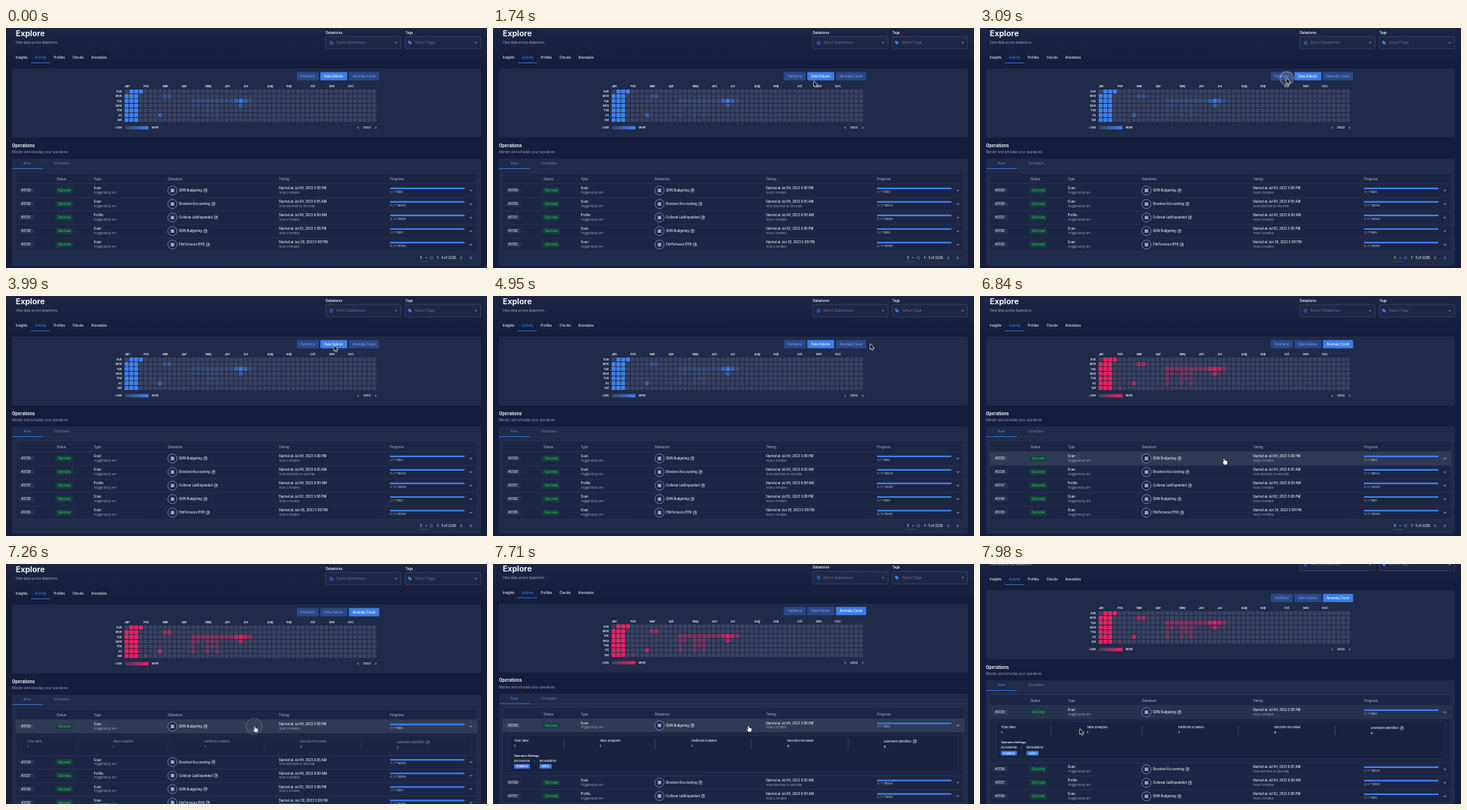
An HTML page with a canvas that plays this animation: 640x320 px, repeating every 8000 ms.

```html
<!DOCTYPE html>
<html lang="en">
<head>
<meta charset="utf-8">
<title>Explore</title>
<style>
html, body { margin: 0; width: 100%; height: 100%; overflow: hidden; background: #141d3b; }
canvas { display: block; width: 640px; height: 320px; }
</style>
</head>
<body>
<canvas></canvas>
<script>
const LOOP = 8000, ROW = 18.05, ROW_TOP = 207.6, PANEL = 58;
const WHITE = '#eef1f8', MUTED = '#a3abc2', DIM = '#6c7794', BLUE = '#3b7ee8', CARD = '#202a49';
const canvas = document.querySelector('canvas'), g = canvas.getContext('2d');
const dpr = window.devicePixelRatio || 1;
canvas.width = 640 * dpr;
canvas.height = 320 * dpr;

const months = { Jan: 0, Feb: 4, Mar: 8, Apr: 12, May: 17, Jun: 21, Jul: 25, Aug: 30, Sep: 34, Oct: 39, Nov: 43, Dec: 47 };
const days = ['Sun', 'Mon', 'Tue', 'Wed', 'Thu', 'Fri', 'Sat'];
// level, weekday, week columns
const heat = [
  [1, 0, [1, 2, 3]],
  ...[1, 2, 3, 4, 5, 6].map(d => [1, d, [0, 1, 2]]),
  [.3, 1, [8, 9]],
  [.17, 2, [14, 15, 16, 17, 18, 19, 20, 21, 22, 26]], [.5, 2, [23, 25]], [.9, 2, [24]],
  [.1, 3, [14, 15, 17, 18, 19]], [.45, 3, [24]],
  [.09, 4, [14, 17, 18, 19]],
  [.5, 5, [7]], [.1, 5, [14, 17, 19]],
  [.05, 6, [4]]
];
const runs = [
  ['#3139', 'Scan', 'QVN Budgeting', 'Jul 04, 2023 5:00 PM', '2 minutes', '1 / 1 Table'],
  ['#3138', 'Scan', 'Brookvel Accounting', 'Jul 04, 2023 6:05 AM', 'less than 20 seconds', '7 / 7 Tables'],
  ['#3137', 'Profile', 'Cellovar LabExpanded', 'Jul 04, 2023 6:00 AM', '2 minutes', '2 / 2 Tables'],
  ['#3136', 'Scan', 'QVN Budgeting', 'Jul 02, 2023 5:00 PM', '2 minutes', '1 / 1 Table'],
  ['#3135', 'Scan', 'ElmTerraces EHR', 'Jun 30, 2023 5:00 PM', '2 minutes', '5 / 5 Tables']
];
// time, x, y of the pointer tip
const path = [
  [240, 440, 326], [960, 430, 80], [1740, 427, 71], [2350, 430, 72], [2950, 408, 67], [3350, 408, 67],
  [4050, 437, 66], [4450, 440, 66], [4950, 502, 64], [5300, 480, 65], [5700, 478, 66],
  [6650, 324, 217], [7000, 324, 217], [7590, 339, 216], [7710, 339, 216], [7980, 133, 220]
];
const clicks = [2990, 5450, 7080];

const clamp = v => Math.max(0, Math.min(1, v));
const ease = v => { v = clamp(v); return v * v * (3 - 2 * v); };

function text(s, x, y, size = 4.15, color = WHITE, weight = 500, align = 'left') {
  g.save();
  g.translate(x, y + size * .36);
  g.scale(.1, .1); // large font scaled down keeps glyph spacing exact
  g.font = `${weight} ${size * 10}px Inter, sans-serif`;
  g.fillStyle = color;
  g.textAlign = align;
  g.fillText(s, 0, 0);
  const w = g.measureText(s).width / 10;
  g.restore();
  return w;
}
function box(x, y, w, h, fill, r = 0, stroke) {
  g.beginPath();
  g.roundRect(x, y, w, h, r);
  if (fill) { g.fillStyle = fill; g.fill(); }
  if (stroke) { g.strokeStyle = stroke; g.lineWidth = .5; g.stroke(); }
}
function line(points, color = WHITE, width = .6) {
  g.beginPath();
  points.forEach(([x, y]) => g.lineTo(x, y));
  g.strokeStyle = color;
  g.lineWidth = width;
  g.stroke();
}
function shape(points, fill) {
  g.beginPath();
  points.forEach(([x, y]) => g.lineTo(x, y));
  g.closePath();
  g.fillStyle = fill;
  g.fill();
}
function circle(x, y, r, fill, stroke, width = .6) {
  g.beginPath();
  g.arc(x, y, r, 0, 7);
  if (fill) { g.fillStyle = fill; g.fill(); }
  if (stroke) { g.strokeStyle = stroke; g.lineWidth = width; g.stroke(); }
}
const caret = (x, y) => shape([[x - 1.5, y - .7], [x + 1.5, y - .7], [x, y + .9]], MUTED);
const chevronV = (x, y, d) => line([[x - 1.6, y - .8 * d], [x, y + .8 * d], [x + 1.6, y - .8 * d]], WHITE, .7);
const chevronH = (x, y, d, s = 1) => line([[x - .8 * d * s, y - 1.6 * s], [x + .8 * d * s, y], [x - .8 * d * s, y + 1.6 * s]], WHITE, .7);
function linkIcon(x, y) {
  box(x, y - 2, 4, 4, null, .4, WHITE);
  line([[x + 1.2, y + .9], [x + 2.9, y - .9]]);
  line([[x + 1.6, y - 1], [x + 3, y - 1], [x + 3, y + .4]]);
}

function header() {
  text('Explore', 13, 7.5, 10.5, WHITE, 700);
  text('View data across datastores', 13, 19.6, 4.15, MUTED, 400);
  text('Datastores', 425.5, 6, 4.2, WHITE, 600);
  text('Tags', 531.5, 6, 4.2, WHITE, 600);
  for (const [x, label] of [[425.5, 'Select Datastores'], [531.5, 'Select Tags']]) {
    box(x, 11.2, 100, 16.8, 'rgba(255,255,255,.025)', 1.5, '#4b5675');
    text(label, x + 14 - (x > 500 ? 1.5 : 0), 19.7, 4.75, DIM, 400);
    caret(x + 93.5, 19.7);
  }
  box(430.8, 17.2, 4.6, 5, '#2f62b8', 1.5);
  line([[430.8, 19], [435.4, 19]], '#18233f', .5);
  line([[430.8, 20.7], [435.4, 20.7]], '#18233f', .5);
  shape([[535, 17.2], [537.5, 17.2], [540.2, 20], [537.8, 22.3], [535, 19.6]], BLUE);
  [['Insights', 13], ['Activity', 38.5], ['Profiles', 63.5], ['Checks', 88.5], ['Anomalies', 113.5]]
    .forEach(([s, x]) => text(s, x, 39.4, 4.15, s === 'Activity' ? BLUE : WHITE));
  box(33, 46, 25.5, .8, BLUE);
}

function heatmap(anomaly) {
  const hue = anomaly ? '#f0205f' : '#3c82f0';
  box(8, 54, 624, 92, CARD, 2);
  [['Partitions', 387, 29], ['Data Volume', 418.3, 35.7], ['Anomaly Count', 456.3, 40.2]].forEach(([s, x, w], i) => {
    const on = i === (anomaly ? 2 : 1);
    box(x, 58.7, w, 11, on ? BLUE : '#2a4886', 1);
    text(s, x + w / 2, 64.2, 4.15, on ? '#fff' : '#7399dd', 500, 'center');
  });
  const cx = c => 157.8 + c * 6.33, cy = d => 81.9 + d * 6.33;
  for (const m in months) text(m, cx(months[m]), 77.6, 3.9, WHITE, 600);
  days.forEach((s, d) => {
    text(s, 154, cy(d) + 2.8, 3.7, WHITE, 600, 'right');
    for (let c = 0; c < 53; c++) box(cx(c), cy(d), 5.4, 5.4, '#39435f', .8);
  });
  for (const [level, d, cols] of heat) {
    g.globalAlpha = anomaly ? Math.sqrt(level) : level;
    cols.forEach(c => box(cx(c), cy(d), 5.4, 5.4, hue, .8));
  }
  g.globalAlpha = 1;
  text('Less', 145.5, 133, 3.8, WHITE, 600);
  text('More', 194, 133, 3.7, WHITE, 600);
  const fade = g.createLinearGradient(158, 0, 189.5, 0);
  fade.addColorStop(0, '#39435f');
  fade.addColorStop(1, hue);
  box(158.3, 130.8, 31.2, 4.4, fade, .5);
  chevronH(468.7, 133, -1, .8);
  text('2023', 480.3, 133, 3.9, WHITE, 600, 'center');
  chevronH(492, 133, 1, .8);
}

function details(open) {
  g.save();
  g.beginPath();
  g.rect(13, ROW_TOP + ROW, 614, PANEL * open);
  g.clip();
  g.globalAlpha = open;
  box(22, 229.5, 596, 49, 'rgba(14,22,48,.18)', 1.5, '#2c3756');
  [['Total Table', 28, 1], ['Table Analyzed', 142, 1], ['Partitions Scanned', 264, 1], ['Records Processed', 391.5, 0], ['Anomalies Identified', 520, 0]]
    .forEach(([s, x, n], i) => {
      const y = 236.9 + (i === 4 ? 1 : 0);
      const w = text(s, x, y, 3.75);
      text(n, x, y + 7, 3.9, WHITE, 700);
      if (i === 4) linkIcon(x + w + 2.5, y);
    });
  [94.5, 215.5, 343.5, 472].forEach(x => box(x, 234.5, .6, 13, '#4b5675'));
  text('Operation Settings', 28, 257, 3.65, WHITE, 700);
  text('Incremental', 28, 264, 3.7);
  text('Remediation', 62, 264, 3.7);
  box(55.3, 262, .4, 4, DIM);
  box(28, 268.2, 21, 6, BLUE, 1);
  text('Enabled', 38.5, 271.2, 3.8, '#fff', 500, 'center');
  box(62, 268.2, 16, 6, BLUE, 1);
  text('None', 70, 271.2, 3.8, '#fff', 500, 'center');
  g.restore();
}

function run([id, type, store, start, took, done], i, y, hover, open) {
  const top = y - ROW / 2;
  if (hover) box(13, top, 614, ROW, 'rgba(255,255,255,.09)');
  else if (!i && open) box(13, top, 614, ROW, 'rgba(255,255,255,.05)');
  box(13, top, 614, .5, '#303b5a');
  box(17, y - 3.4, 20, 6.8, 'rgba(255,255,255,.05)', 1);
  text(id, 20.3, y, 4.3);
  box(66.3, y - 3.7, 22.5, 7.4, '#15403f', 1);
  text('Success', 77.5, y, 4.2, '#35c14e', 500, 'center');
  text(type, 116.8, y - 3, 4.15);
  text('Triggered by API', 116.8, y + 2.8, 3.8, MUTED, 400);
  circle(221.5, y, 6.1, '#1b2747', '#aab5d0');
  box(219.2, y - 2.3, 4.6, 4.6, '#8ea6d2', .3);
  const w = text(store, 230.3, y, 4.15);
  linkIcon(230.3 + w + 2.4, y);
  text('Started at ' + start, 363, y - 3, 4.15);
  text('Took ' + took, 363, y + 2.8, 3.8, MUTED, 400);
  box(511, y - 3.9, 99, 2.2, BLUE, .4);
  text(done, 511, y + 1.7, 3.8, '#c3c9d9', 400);
  chevronV(618.5, y, !i && open > .5 ? -1 : 1);
}

function operations(open, hovered) {
  const shift = PANEL * open;
  text('Operations', 8, 156.6, 5.6, WHITE, 700);
  text('Monitor and schedule your operations', 8, 165.8, 4.15, MUTED, 400);
  box(8, 174, 624, 143 + shift, CARD, 2);
  box(8, 187.4, 624, .5, '#303b5a');
  text('Runs', 28.5, 181, 4.15, BLUE, 500, 'center');
  text('Schedules', 74.5, 181, 4.15, DIM, 500, 'center');
  box(8, 187, 41, .8, BLUE);
  box(13, 193, 614, 104.9 + shift, 'rgba(15,23,50,.22)', 1, '#303b5a');
  [['Status', 67.3], ['Type', 116.8], ['Datastore', 215.5], ['Timing', 363], ['Progress', 511]]
    .forEach(([s, x]) => text(s, x, 201.4, 4.2, MUTED));
  runs.forEach((r, i) => run(r, i, ROW_TOP + ROW * (i + .5) + (i ? shift : 0), i === hovered, open));
  if (open) details(open);
  const y = 306.4 + shift;
  text('5', 551, y, 4.2);
  caret(559, y);
  box(549, y + 4.5, 13, .4, DIM);
  circle(566, y, 1.9, null, BLUE, .7);
  line([[566, y - 1.1], [566, y], [566.9, y + .4]], BLUE, .5);
  text('1 - 5 of 2228', 573.5, y, 4.2);
  chevronH(605.8, y, -1, 1.2);
  chevronH(618.3, y, 1, 1.2);
}

function pointerAt(t) {
  if (t < path[0][0]) return null;
  const i = path.findIndex(p => p[0] > t);
  if (i < 0) return path[path.length - 1].slice(1);
  const a = path[i - 1], b = path[i], k = ease((t - a[0]) / (b[0] - a[0]));
  return [a[1] + (b[1] - a[1]) * k, a[2] + (b[2] - a[2]) * k];
}
function pointer([x, y], hand, t) {
  for (const c of clicks) {
    const k = (t - c) / 230;
    if (k < 0 || k > 1) continue;
    g.globalAlpha = Math.min(1, 2 * (1 - k)) * .75;
    circle(x, y, 6.5 + k * 5.5, 'rgba(200,210,230,.15)', '#b9c1d3', .9);
    g.globalAlpha = 1;
  }
  g.save();
  g.translate(x, y);
  g.lineJoin = 'round';
  g.strokeStyle = hand ? '#111' : '#fff';
  g.lineWidth = hand ? .6 : 1.1;
  const p = new Path2D(hand
    ? 'M0 .6Q.1-.3.9 0L1.7 2.6Q2.6 2 3.2 2.8Q4 2.5 4.4 3.3Q5.2 3.2 5.2 4.2L4.9 6.2L4.2 7.7H1.2L-1.3 4.8Q-1.3 3.9-.4 4.2L.6 4.8Z'
    : 'M0 0V7L1.6 5.5L2.7 8.1L3.9 7.6L2.8 5.1H5Z');
  g.stroke(p);
  g.fillStyle = hand ? '#fff' : '#0b0d14';
  g.fill(p);
  g.restore();
}

function draw(t) {
  const scroll = 19 * Math.pow(clamp((t - 7640) / 340), 1.7);
  const open = ease((t - 7130) / 260);
  const tip = pointerAt(t);
  let hovered = -1;
  if (tip) {
    const y = tip[1] + scroll - ROW_TOP, shift = PANEL * open;
    if (y >= 0 && y < ROW) hovered = 0;
    else if (y >= ROW + shift && y < ROW * 5 + shift) hovered = Math.floor((y - shift) / ROW);
  }
  g.setTransform(dpr, 0, 0, dpr, 0, 0);
  g.fillStyle = '#141d3b';
  g.fillRect(0, 0, 640, 320);
  g.translate(0, -scroll);
  const glow = g.createLinearGradient(0, 0, 0, 52);
  glow.addColorStop(0, '#1c2643');
  glow.addColorStop(1, '#141d3b');
  box(0, 0, 640, 52, glow);
  header();
  heatmap(t >= 5520);
  operations(open, hovered);
  g.translate(0, scroll);
  if (tip) pointer(tip, hovered >= 0, t);
}

const start = performance.now();
(function tick() {
  draw((performance.now() - start) % LOOP);
  requestAnimationFrame(tick);
})();
</script>
</body>
</html>
```
